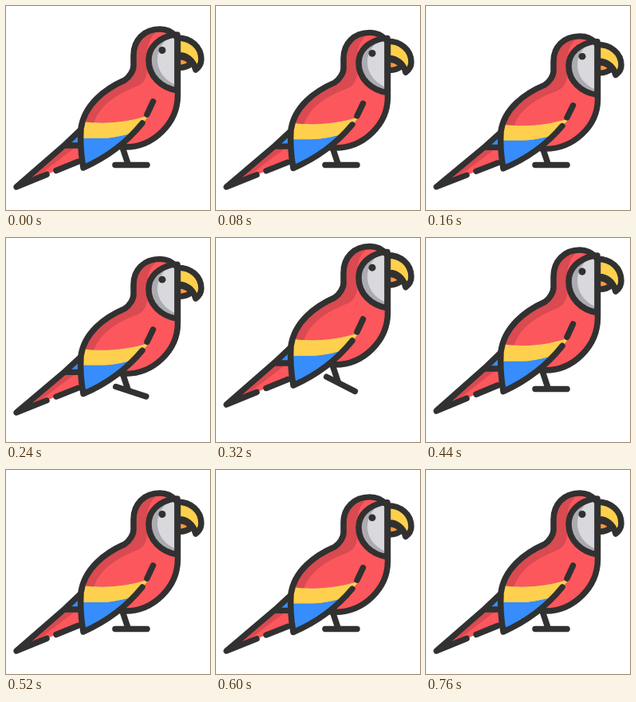
An HTML page with a canvas for the animation above (3560 ms loop, 256 by 256 pixels).

```html
<!DOCTYPE html>
<html lang="en">
<head>
<meta charset="utf-8">
<title>Hopping parrot</title>
<style>
html, body { margin: 0; width: 100%; height: 100%; overflow: hidden; background: #fff; }
canvas { display: block; width: 256px; height: 256px; }
</style>
</head>
<body>
<canvas id="stage"></canvas>
<script>
const canvas = document.getElementById('stage');
const ctx = canvas.getContext('2d');
const ratio = window.devicePixelRatio || 1;
canvas.width = canvas.height = 256 * ratio;

const LOOP = 3560, STEP = 40, END = 760, GROUND = 227;
const INK = '#303130', RED = '#fc575d', DARK_RED = '#d94a51';
const YELLOW = '#ffd04d', BLUE = '#368dfb', ORANGE = '#fb9640';
const GREY = '#d9d8dd', DARK_GREY = '#acabb1';

const P = d => new Path2D(d);
const back = 'M213 38 C208 32 201 29 193 29 C173 29 160 43 160 62 V75 ' +
  'C160 81 155 89 149 93 C124 104 98 124 94 154 C93 170 94 186 97 203 ';
const wingEdge = 'C122 192 150 173 171 147 ';
const belly = 'H150 C185 177 215.5 147 215.5 112 V42 ';

const shape = {
  tail: P('M13 227 L74 174 L94 155 L97 203 L90 195.5 Z'),
  tailShade: P('M13 227 L74 175 H90 L34 218 Z'),
  tailBlue: P('M74 175 L94 154 V175 Z'),
  tailLines: P('M51 211.5 L13 227 L74 174 L94 155 M74 175 H94 M63 206.5 L90 195.5'),
  body: P(back + 'L140 177 ' + belly + 'Z'),
  bodyLine: P(back + wingEdge + 'M177 136 L184.5 120 M145 177 ' + belly),
  backShade: P('M202 25 C186 30 177 43 177 60 V77 C177 88 174 96 166 100 ' +
    'C134 112 114 128 109 152 H80 V85 H155 V25 Z'),
  wing: P('M94 154 C93 170 94 186 97 203 ' + wingEdge + 'L180 137 L94 144 Z'),
  band: P('M88 144 C120 149 150 147 180 137 L165 157 C140 166 115 168 88 166 Z'),
  face: P('M210 36 C192 40 179 51 179 68 C179 88 195 103 215 106 V36 Z'),
  faceShade: P('M210 36 C192 40 179 51 179 68 C179 88 195 103 215 106 V100 ' +
    'C200 94 190 82 190 67 C190 54 198 42 210 36 Z'),
  lowerBeak: P('M215 64 H221 C227 65 231 69 233 72 C228 76 222 78 215 77 Z'),
  beak: P('M215 40 C232 40 245 51 245 67 C245 72 242 77 238 80 C236 71 230 64 221 62 H215 Z'),
  leg: P('M146 177 L153 198')
};

// time, lift, stretch, foot angle in degrees
const poses = [
  [0, 0, 1, 0],
  [160, 0, 0.955, 0],
  [240, -8, 0.973, 18],
  [320, -18, 1.002, 27],
  [360, -20.5, 1.01, 28],
  [440, -10, 1.02, 0],
  [520, 0, 1, 0],
  [560, 0, 0.965, 0],
  [600, 0, 0.975, 0],
  [760, 0, 1, 0]
];

function poseAt(t) {
  let i = 1;
  while (i < poses.length - 1 && poses[i][0] < t) i++;
  const a = poses[i - 1], b = poses[i];
  const k = Math.min(1, (t - a[0]) / (b[0] - a[0]));
  return a.map((v, n) => v + (b[n] - v) * k);
}

function fill(name, color) {
  ctx.fillStyle = color;
  ctx.fill(shape[name]);
}

function line(name) {
  ctx.stroke(shape[name]);
}

function clipped(name, paint) {
  ctx.save();
  ctx.clip(shape[name]);
  paint();
  ctx.restore();
}

function drawFoot(lift, angle) {
  ctx.save();
  ctx.translate(0, lift);
  line('leg');
  ctx.translate(153, 199.5);
  ctx.rotate(angle * Math.PI / 180);
  ctx.beginPath();
  ctx.moveTo(-16, 0);
  ctx.lineTo(24, 0);
  ctx.stroke();
  ctx.restore();
}

function drawTail() {
  fill('tail', RED);
  fill('tailShade', DARK_RED);
  fill('tailBlue', BLUE);
  line('tailLines');
}

function drawBody() {
  fill('body', RED);
  clipped('body', () => fill('backShade', DARK_RED));
  clipped('wing', () => {
    fill('wing', BLUE);
    fill('band', YELLOW);
  });
  // the wing's red part above the band
  clipped('body', () => {
    ctx.beginPath();
    ctx.moveTo(88, 144);
    ctx.bezierCurveTo(120, 149, 150, 147, 180, 137);
    ctx.lineTo(109, 135);
    ctx.closePath();
    ctx.fillStyle = RED;
    ctx.fill();
    fill('backShade', DARK_RED);
    ctx.clip(shape.wing);
    fill('band', YELLOW);
    ctx.fillStyle = BLUE;
    ctx.fillRect(80, 166, 60, 40);
  });
}

function drawHead() {
  fill('lowerBeak', ORANGE);
  line('lowerBeak');
  fill('beak', YELLOW);
  line('beak');
  fill('face', GREY);
  fill('faceShade', DARK_GREY);
  line('face');
  ctx.fillStyle = INK;
  ctx.beginPath();
  ctx.arc(196, 55.5, 4.5, 0, Math.PI * 2);
  ctx.fill();
}

function frame(now) {
  const t = Math.min(END, Math.floor(now % LOOP / STEP) * STEP);
  const [, lift, stretch, angle] = poseAt(t);
  ctx.setTransform(ratio, 0, 0, ratio, 0, 0);
  ctx.fillStyle = '#fff';
  ctx.fillRect(0, 0, 256, 256);
  ctx.strokeStyle = INK;
  ctx.lineWidth = 7.5;
  ctx.lineCap = ctx.lineJoin = 'round';

  drawFoot(lift, angle);
  ctx.translate(0, GROUND + lift);
  ctx.scale(1, stretch);
  ctx.translate(0, -GROUND);
  drawTail();
  drawBody();
  drawHead();
  line('bodyLine');
}

const start = performance.now();
function tick() {
  frame(performance.now() - start);
  requestAnimationFrame(tick);
}
tick();
</script>
</body>
</html>
```
